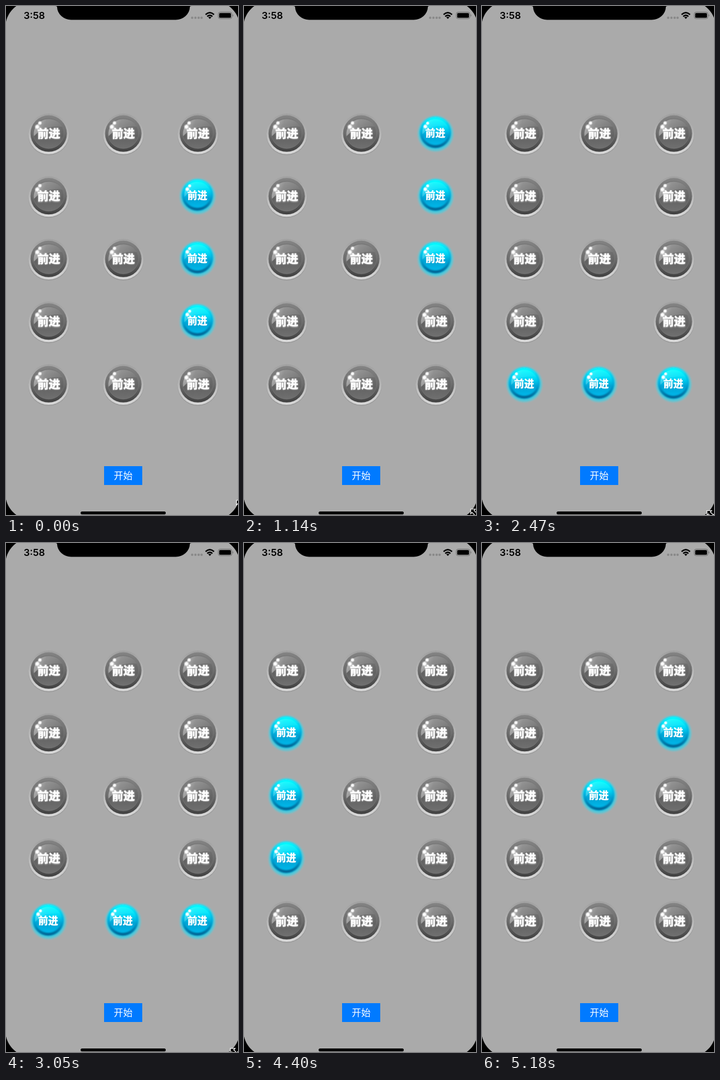
Animation of 395x865 px, one loop 6350 ms. Source, as an HTML page:

```html
<!DOCTYPE html>
<html lang="zh">
<head>
<meta charset="utf-8">
<title>Light ring</title>
<style>
  html, body { margin: 0; width: 100%; height: 100%; overflow: hidden; background: #000; }
  svg { display: block; width: 395px; height: 865px; }
  text { font-family: "Noto Sans CJK SC", "Noto Sans CJK", sans-serif; fill: #fff; text-anchor: middle; }
  .label { font-weight: 900; stroke: #fff; stroke-width: .5; }
  .clock { font: 600 16.5px Inter, sans-serif; fill: #000; text-anchor: start; }
</style>
</head>
<body>
<svg viewBox="0 0 395 865">
  <defs>
    <linearGradient id="rim" x2="0" y2="1">
      <stop offset="0" stop-color="#a0a0a0"/><stop offset=".5" stop-color="#b6b6b6"/><stop offset="1" stop-color="#dadada"/>
    </linearGradient>
    <linearGradient id="bowl" x2="0" y2="1">
      <stop offset="0" stop-color="#848484"/><stop offset=".5" stop-color="#6c6c6c"/><stop offset="1" stop-color="#404040"/>
    </linearGradient>
    <linearGradient id="face" x2="0" y2="1">
      <stop offset="0" stop-color="#7a7a7a"/><stop offset=".6" stop-color="#626262"/><stop offset="1" stop-color="#707070"/>
    </linearGradient>
    <linearGradient id="gloss" x2="1" y2=".2">
      <stop offset="0" stop-color="#fff" stop-opacity=".55"/><stop offset=".45" stop-color="#fff" stop-opacity=".2"/>
      <stop offset="1" stop-color="#fff" stop-opacity=".08"/>
    </linearGradient>
    <radialGradient id="spark">
      <stop offset=".35" stop-color="#fff"/><stop offset="1" stop-color="#fff" stop-opacity="0"/>
    </radialGradient>
    <radialGradient id="shade">
      <stop offset=".93" stop-color="#777" stop-opacity=".5"/><stop offset="1" stop-color="#888" stop-opacity="0"/>
    </radialGradient>
    <radialGradient id="halo">
      <stop offset=".74" stop-color="#2ccbe6"/><stop offset=".87" stop-color="#58c8d8" stop-opacity=".8"/>
      <stop offset="1" stop-color="#8abcc2" stop-opacity="0"/>
    </radialGradient>
    <linearGradient id="seaRim" x2="0" y2="1">
      <stop offset="0" stop-color="#0cf0ff"/><stop offset=".5" stop-color="#00aedd"/><stop offset="1" stop-color="#005f90"/>
    </linearGradient>
    <linearGradient id="sea" x2="0" y2="1">
      <stop offset="0" stop-color="#0ff"/><stop offset=".35" stop-color="#02daf7"/>
      <stop offset=".65" stop-color="#00a2d4"/><stop offset="1" stop-color="#00b8ea"/>
    </linearGradient>
    <filter id="soft" x="-20%" y="-30%" width="140%" height="160%"><feGaussianBlur stdDeviation="1.2"/></filter>
    <filter id="blur"><feGaussianBlur stdDeviation=".9"/></filter>

    <g id="sparks">
      <circle cx="-19.5" cy="-12" r="5" fill="url(#spark)"/>
      <circle cx="-15" cy="-18.5" r="4" fill="url(#spark)"/>
    </g>
    <path id="sheen" d="M-25 4C-27-13-15-25 0-25 11-25 19-20 23-12 5-14-13-10-25 4Z" fill="url(#gloss)"/>

    <g id="off">
      <circle cy="1.5" r="35.5" fill="url(#shade)"/>
      <circle r="34.5" fill="url(#rim)"/>
      <circle cy="-.5" r="31" fill="url(#bowl)"/>
      <circle cy="-1" r="26" fill="url(#face)" stroke="#808080" stroke-opacity=".5"/>
      <use href="#sheen"/>
      <use href="#sparks"/>
      <text class="label" y="7" font-size="19.5" fill-opacity=".5" filter="url(#soft)">前进</text>
      <text class="label" y="6.3" font-size="19.5">前进</text>
    </g>

    <g id="on">
      <circle cx="-.5" cy="-.5" r="33" fill="url(#halo)"/>
      <g filter="url(#blur)">
        <circle cx="-.8" cy="-2.5" r="26.5" fill="url(#seaRim)"/>
        <circle cx="-.8" cy="-4" r="23" fill="url(#sea)"/>
      </g>
      <use href="#sheen" transform="translate(-1 -3) scale(.87)" opacity=".55"/>
      <use href="#sparks" transform="translate(-1 -2) scale(.87)"/>
      <text class="label" x="-1" y="4.3" font-size="17">前进</text>
    </g>
  </defs>

  <rect x="-1" y="-8" width="399" height="881" rx="44" fill="#aaa"/>
  <path d="M84 0H316Q313 0 313 2A25 22 0 0 1 289 23.5H111A25 22 0 0 1 87 2Q87 0 84 0Z"/>

  <text class="clock" x="30" y="22">3:58</text>
  <g fill="#888">
    <circle cx="317" cy="20" r="2"/><circle cx="322.5" cy="20" r="2"/>
    <circle cx="328" cy="20" r="2"/><circle cx="333" cy="20" r="2"/>
  </g>
  <g fill="none" stroke="#000" stroke-width="2.4">
    <path d="M339.8 14.6Q347 8 354.2 14.6"/>
    <path d="M342.6 17.8Q347 13.6 351.4 17.8"/>
    <path d="M344.4 19.3Q347 17 349.6 19.3L347 22Z" fill="#000" stroke="none"/>
  </g>
  <rect x="361.5" y="10.5" width="23" height="11" rx="3" fill="none" stroke="#666"/>
  <rect x="363" y="12" width="20" height="8" rx="1.6"/>
  <path d="M386 14Q388 16 386 18Z" fill="#666"/>

  <g id="board"></g>

  <rect x="167" y="782" width="65" height="32" fill="#007aff"/>
  <text x="199.5" y="804" font-size="16">开始</text>
  <rect x="127" y="859" width="145" height="5" rx="2.5"/>

  <path id="pointer" d="M0 0H8L5.7 2.3 10.7 7.3 13 5V13H5L7.3 10.7 2.3 5.7 0 8Z" stroke="#fff" stroke-width="1.2"/>
</svg>

<script>
const LOOP = 6350, FINISH = 5180;
const STEP = 48.65, LEAD = 26;
// Cells as [column, row], clockwise from the top left; the centre is last.
const ring = [[0,0],[1,0],[2,0],[2,1],[2,2],[2,3],[2,4],[1,4],[0,4],[0,3],[0,2],[0,1]];
const cells = [...ring, [1,2]];
const CENTRE = 12, WINNER = 3;

// Screen refreshes: [start, refreshes until the next start].
const refreshes = [[0,1],[50,12],[740,12],[1430,12],[2110,11],[2760,12],[3440,11],[4100,11],[4760,7],[FINISH,1]];
const pointerPath = [[0,392.5,840],[450,387,854],[1140,386,855],[1880,384,856],[3050,382,859],[3650,380,867]];

const board = document.getElementById('board');
const pointer = document.getElementById('pointer');

function addUse(name, [col, row]) {
  const use = document.createElementNS('http://www.w3.org/2000/svg', 'use');
  use.setAttribute('href', '#' + name);
  use.setAttribute('transform', `translate(${72.7 + col * 127} ${217.3 + row * 106.5})`);
  return board.appendChild(use);
}
const lamps = cells.map(cell => ({ off: addUse('off', cell), on: addUse('on', cell) }));

function lastRefresh(t) {
  if (t >= FINISH) return FINISH;
  const i = refreshes.findIndex(([start], k) => t >= start && t < refreshes[k + 1][0]);
  const [start, count] = refreshes[i];
  const gap = (refreshes[i + 1][0] - start) / count;
  const snap = n => Math.floor((start + n * gap) / 10) * 10;
  let n = Math.floor((t - start) / gap);
  if (n + 1 < count && snap(n + 1) <= t) n++;
  return snap(n);
}

function litCells(t) {
  if (t >= FINISH) return [WINNER, CENTRE];
  const tail = 3 + Math.floor((t + LEAD) / STEP);
  return [0, 1, 2].map(k => (tail + k) % ring.length);
}

function pointerAt(t) {
  const i = pointerPath.findIndex(([time]) => time > t);
  if (i < 0) return null;
  const [t0, x0, y0] = pointerPath[i - 1], [t1, x1, y1] = pointerPath[i];
  const f = (t - t0) / (t1 - t0);
  return [x0 + (x1 - x0) * f, y0 + (y1 - y0) * f];
}

function draw(time) {
  const t = lastRefresh(time % LOOP);
  const lit = litCells(t);
  lamps.forEach(({ off, on }, i) => {
    const isLit = lit.includes(i);
    on.style.display = isLit ? '' : 'none';
    off.style.display = isLit ? 'none' : '';
  });
  const spot = pointerAt(t);
  pointer.style.display = spot ? '' : 'none';
  if (spot) pointer.setAttribute('transform', `translate(${spot})`);
}

let origin;
function tick(now) {
  origin ??= now;
  draw(now - origin);
  requestAnimationFrame(tick);
}
draw(0);
requestAnimationFrame(tick);
</script>
</body>
</html>
```
